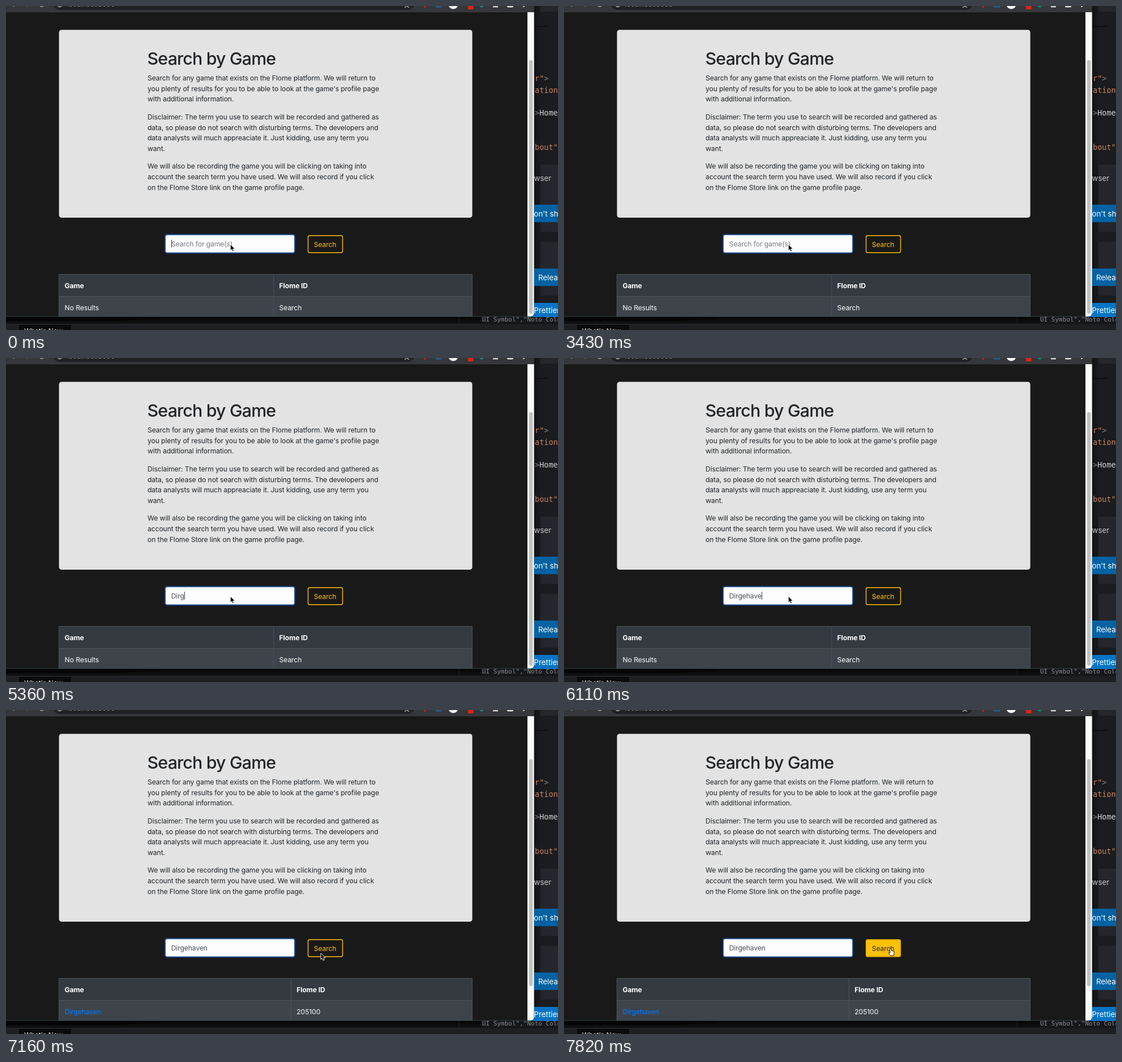
Animation of 975x574 px, one loop 8 s. Source, as an HTML page:

```html
<!DOCTYPE html>
<html lang="en">
<head>
<meta charset="utf-8">
<title>Search by Game</title>
<style>
html, body { margin: 0; width: 100%; height: 100%; overflow: hidden; background: #191919; }
svg { display: block; width: 975px; height: 574px; }
text { font-family: Inter, "Open Sans", sans-serif; font-size: 12.2px; letter-spacing: -.125px; font-optical-sizing: none; white-space: pre; }
.title { font-size: 30.4px; font-weight: 500; letter-spacing: -.86px; }
.bold { font-weight: 700; }
.side { font-size: 13.3px; letter-spacing: 0; }
.code { font-family: "DejaVu Sans Mono", monospace; font-size: 13.5px; letter-spacing: 0; }
</style>
</head>
<body>
<svg viewBox="0 0 975 574">
  <defs>
    <linearGradient id="shadeX"><stop offset="0" stop-opacity=".35"/><stop offset="1" stop-opacity="0"/></linearGradient>
    <linearGradient id="shadeY" x2="0" y2="1"><stop offset="0" stop-opacity=".75"/><stop offset="1" stop-opacity=".2"/></linearGradient>
    <clipPath id="page"><path d="M0 0H932.7V543Q932.7 550.6 925 550.6H0Z"/></clipPath>
  </defs>

  <!-- editor behind the window -->
  <rect width="975" height="574" fill="#1b1c1f"/>
  <g fill="#25262b">
    <rect x="944" width="31" height="10"/>
    <rect x="944" y="281" width="31" height="119"/>
    <rect x="944" y="418" width="31" height="95"/>
  </g>
  <rect x="932" width="14" height="551" fill="url(#shadeX)"/>
  <path d="M932 36.8L958 35.8" stroke="#08080a"/>
  <g fill="#0062a3">
    <rect x="930" y="352" width="45" height="31"/>
    <rect x="930" y="465" width="45" height="31"/>
    <rect x="930" y="526" width="45" height="25" fill="#0674c4"/>
  </g>
  <g fill="#c8825f">
    <text class="code" x="934" y="133">r"<tspan fill="#808080">&gt;</tspan></text>
    <text class="code" x="934" y="153.5">ation</text>
    <text class="code" x="934" y="193.5" fill="#d0d0d0"><tspan fill="#808080">&gt;</tspan>Home</text>
    <text class="code" x="934" y="254.5">bout"</text>
  </g>
  <g fill="#fff">
    <text class="side" x="932.5" y="309.5" fill="#c4c4c4">wser</text>
    <text class="side" x="932.5" y="372.5">on't sh</text>
    <text class="side" x="940" y="485.5">Relea</text>
    <text class="side" x="932.5" y="543.5">Prettier</text>
  </g>

  <!-- strip below the window -->
  <rect y="551" width="975" height="13" fill="#16171a"/>
  <text class="code" x="841" y="559" fill="#8c8c8c" style="font-size:11px">UI Symbol","Noto Color</text>
  <rect y="550" width="840" height="14" fill="url(#shadeY)"/>
  <path d="M0 558H190L270 555V550H0Z" fill="#050506"/>
  <path d="M800.5 551V564" stroke="#34353a" stroke-dasharray="2 2"/>
  <rect y="564" width="975" height="10" fill="#1d1f23"/>
  <rect y="563.5" width="840" height="1" fill="#2c2e33"/>
  <rect x="23" y="565" width="92" height="9" fill="#0a0a0b"/>
  <text x="32" y="580" fill="#d8d8d8">What's New</text>

  <!-- browser window -->
  <g clip-path="url(#page)">
    <rect width="933" height="551" fill="#191919"/>
    <rect width="933" height="11" fill="#36373a"/>
    <rect y="10" width="933" height="1" fill="#3c3d40"/>
    <rect x="82" y="-20" width="640" height="27" rx="13" fill="#202124"/>
    <g fill="none" stroke="#a9abae" stroke-width="1.4">
      <path d="M10 -3L14 1"/><path d="M41 -3L37 1" opacity=".6"/>
      <circle cx="63" cy="-4" r="5"/><circle cx="95" cy="-3" r="4.5"/>
      <path d="M704 3L708 0L712 3"/>
    </g>
    <text x="108" y="0.8" fill="#a0a2a5">localhost:3000</text>
    <rect x="738" y="-4" width="4" height="7" fill="#b3262b"/>
    <rect x="759" y="-4" width="11" height="7" fill="#245b7d"/>
    <circle cx="790" cy="-3" r="8.5" fill="#f4f4f4"/>
    <rect x="816" y="-4" width="9.5" height="10" rx="1" fill="#e02418"/>
    <circle cx="840" cy="-2" r="4.5" fill="#17847c"/>
    <rect x="860" y="-5" width="9" height="7.5" fill="#c9cacc"/>
    <rect x="885" y="-5" width="11" height="7.5" rx="2" fill="#dedede"/>
    <circle cx="914.5" cy="0.5" r="1.5" fill="#c9cacc"/>

    <rect x="93.6" y="42.2" width="730" height="332.8" rx="4.6" fill="#e3e3e3"/>
    <text class="title" x="249.6" y="104.2" fill="#212529">Search by Game</text>
    <g id="intro" fill="#212529"></g>

    <rect x="279.6" y="403.6" width="232" height="35.4" rx="4.6" fill="#14335f"/>
    <rect x="281.6" y="405.6" width="228" height="31.4" rx="3" fill="#fdfdfd" stroke="#2b5fae" stroke-width=".9"/>
    <text id="entry" x="291.7" y="425.9"></text>
    <rect id="caret" y="414" width="1" height="14" fill="#3a3f44"/>
    <rect id="button" x="533.5" y="406.8" width="61" height="30.2" rx="3" stroke-width="1.4"/>
    <text id="label" x="563.6" y="426.6" text-anchor="middle">Search</text>

    <rect x="93.5" y="475.5" width="730" height="39" fill="#343a40"/>
    <rect x="93.5" y="514.5" width="730" height="36" fill="#3e444a"/>
    <path d="M93.5 551V475.5H823.5V551M93.5 514.5H823.5" fill="none" stroke="#4b535b"/>
    <path id="split" stroke="#4b535b"/>
    <g fill="#fff">
      <text class="bold" x="103.6" y="499.5">Game</text>
      <text class="bold" id="head2" y="499.5">Flome ID</text>
      <text id="cell1" x="103.6" y="538.8"></text>
      <text id="cell2" y="538.8"></text>
    </g>

    <rect x="921" y="11" width="12" height="540" fill="#fafafa"/>
    <rect id="thumb" x="924" width="6.4" rx="3.2" fill="#c1c1c1"/>
    <rect y="549.7" width="933" height="1" fill="#40555b"/>
  </g>

  <path id="arrow" d="M0 0V11L2.5 8.7L4.3 12.7L6.2 11.9L4.5 8H8Z" fill="#000" stroke="#fff" stroke-width=".9" stroke-linejoin="round"/>
  <path id="hand" d="M2.6 0.8Q3.8 0 4.2 1.2L5 4.4Q6.2 4 6.8 4.9Q8 4.6 8.5 5.7Q9.8 5.6 10 7L9.6 10.4L8.6 13.6H3.8L1 9.6Q-.3 7.8 .7 7.3Q1.7 7 2.9 8.4L1.9 2Q1.8 1.2 2.6 .8Z" fill="#fff" stroke="#000" stroke-width=".9"/>
</svg>
<script>
const LOOP = 8000, TERM = "Dirgehaven", HINT = "Search for game(s)";
const $ = id => document.getElementById(id);
const set = (id, attrs) => { for (const k in attrs) $(id).setAttribute(k, attrs[k]); };

const paragraphs = [
  ["Search for any game that exists on the Flome platform. We will return to",
   "you plenty of results for you to be able to look at the game's profile page",
   "with additional information."],
  ["Disclaimer: The term you use to search will be recorded and gathered as",
   "data, so please do not search with disturbing terms. The developers and",
   "data analysts will much appreaciate it. Just kidding, use any term you",
   "want."],
  ["We will also be recording the game you will be clicking on taking into",
   "account the search term you have used. We will also record if you click",
   "on the Flome Store link on the game profile page."]
];
let lineY = 131.8;
for (const lines of paragraphs) {
  for (const line of lines) {
    const el = document.createElementNS("http://www.w3.org/2000/svg", "text");
    el.setAttribute("x", 250);
    el.setAttribute("y", lineY.toFixed(1));
    el.textContent = line;
    $("intro").append(el);
    lineY += 18.8;
  }
  lineY += 12.5;
}

// [time, letters typed]
const typing = [[0, 0], [4320, 1], [5070, 3], [5360, 4], [5510, 5], [5660, 6], [5810, 7], [5960, 8], [6110, 9], [6260, 10]];
// the caret flips at each of these times
const blinks = [450, 890, 1340, 1940, 2390, 2840, 3430, 3880, 4770, 5070, 6860, 7490, 7820];
// [time, x, y, shape]
const pointer = [[0, 396.3, 422.3, "arrow"], [7010, 412.7, 398.6, "arrow"], [7160, 556, 431, "arrow"], [7490, 573.2, 421.9, "hand"]];
// [time, fill, border, label]
const buttonLook = [[0, "none", "#ffc107", "#ffc107"], [7490, "#765817", "#c99a0e", "#a67c0d"], [7670, "#ffc107", "#d9a406", "#212529"]];

const at = (steps, t) => steps.filter(s => s[0] <= t).pop();

function draw(t) {
  const typed = at(typing, t)[1];
  const entry = $("entry");
  entry.textContent = typed ? TERM.slice(0, typed) : HINT;
  entry.setAttribute("fill", typed ? "#495057" : "#777b80");
  const caretX = typed ? Math.round(291.5 + entry.getComputedTextLength()) : 292;
  const lit = blinks.filter(b => b <= t).length % 2 === 0;
  set("caret", { x: caretX, visibility: lit ? "visible" : "hidden" });

  const [, fill, stroke, ink] = at(buttonLook, t);
  set("button", { fill, stroke });
  set("label", { fill: ink });

  const found = t >= 7160, col = found ? 503.5 : 472.8;
  set("split", { d: `M${col} 475.5V551` });
  set("head2", { x: col + 9.8 });
  set("cell2", { x: col + 9.8 });
  set("cell1", { fill: found ? "#007bff" : "#fff" });
  $("cell1").textContent = found ? TERM : "No Results";
  $("cell2").textContent = found ? "205100" : "Search";
  set("thumb", found ? { y: 87, height: 402 } : { y: 96, height: 449 });

  const [, x, y, shape] = at(pointer, t);
  for (const id of ["arrow", "hand"])
    set(id, { transform: `translate(${x} ${y})`, visibility: id === shape ? "visible" : "hidden" });
}

const start = performance.now();
function tick() {
  draw((performance.now() - start) % LOOP);
  requestAnimationFrame(tick);
}
tick();
</script>
</body>
</html>
```
